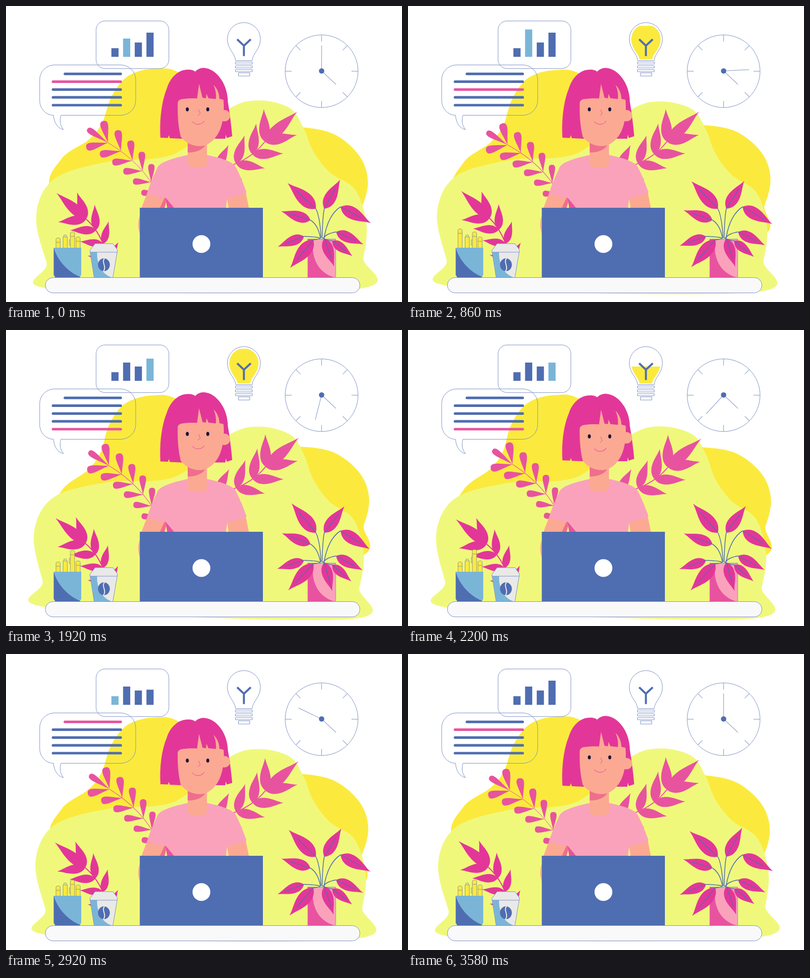
Write an HTML page with a canvas that moves like this. It is 800x600 px and loops after 3600 ms.

```html
<!DOCTYPE html>
<html lang="en">
<head>
<meta charset="utf-8">
<title>Working at the desk</title>
<style>
html, body { margin: 0; width: 100%; height: 100%; overflow: hidden; background: #fff; }
canvas { display: block; width: 800px; height: 600px; }
</style>
</head>
<body>
<canvas id="stage" width="800" height="600"></canvas>
<script>
const g = document.getElementById('stage').getContext('2d');
const LOOP = 3600, ACTION = 3560;
const HAIR = '#e23798', PINK = '#e8539f', ROSE = '#faa2bb', SKIN = '#fca993', SHADE = '#ee6f8b';
const BLUE = '#4f6db1', SKY = '#7ab5d8', YELLOW = '#fbea3d', LIME = '#f0f87c', LINE = '#8093c8';

const soft = p => (1 - Math.cos(Math.PI * p)) / 2;
const clamp = p => Math.min(1, Math.max(0, p));
const mix = (a, b, p) => a + (b - a) * p;
const ramp = (u, a, b) => clamp((u - a) / (b - a));
// eases 0 to 1 over a..b, then back to 0 over c..d
const swell = (u, a, b, c, d) => soft(ramp(u, a, b)) - soft(ramp(u, c, d));

function fill(d, color) {
  g.fillStyle = color;
  g.fill(new Path2D(d));
}
function line(d, color = LINE, width = 1) {
  g.strokeStyle = color;
  g.lineWidth = width;
  g.stroke(new Path2D(d));
}
function rect(x, y, w, h, color) {
  g.fillStyle = color;
  g.fillRect(x, y, w, h);
}
function oval(x, y, rx, ry, color) {
  g.fillStyle = color;
  g.beginPath();
  g.ellipse(x, y, rx, ry, 0, 0, 7);
  g.fill();
}
function box(x, y, w, h, r, color = 'transparent') {
  g.beginPath();
  g.roundRect(x, y, w, h, r);
  g.fillStyle = color;
  g.fill();
  g.strokeStyle = LINE;
  g.lineWidth = 1;
  g.stroke();
}
function within(change, draw) {
  g.save();
  change();
  draw();
  g.restore();
}
function spin(x, y, deg, draw) {
  within(() => {
    g.translate(x, y);
    g.rotate(deg * Math.PI / 180);
    g.translate(-x, -y);
  }, draw);
}

// smooth closed curve through a few points
function blob(points, color) {
  const n = points.length, at = i => points[(i + n) % n];
  let d = `M${at(0)}`;
  for (let i = 0; i < n; i++) {
    const [a, b, c, e] = [at(i - 1), at(i), at(i + 1), at(i + 2)];
    d += `C${b.map((v, k) => v + (c[k] - a[k]) / 6)} ${c.map((v, k) => v - (e[k] - b[k]) / 6)} ${c}`;
  }
  fill(d, color);
}
const HILL_BACK = [[92, 375], [112, 310], [167, 271], [194, 237], [214, 182], [248, 141], [303, 127],
  [360, 141], [480, 237], [545, 249], [600, 246], [665, 261], [714, 304], [731, 355], [718, 410],
  [680, 480], [200, 480]];
const HILL_FRONT = [[105, 575], [82, 520], [61, 425], [97, 351], [205, 316], [310, 308], [365, 285],
  [450, 209], [510, 191.5], [572, 206], [600, 245], [621, 295], [655, 338], [705, 372], [728, 440],
  [722, 510], [700, 575]];

// leaf of a given length, pointed or round at its end
function leaf(x, y, deg, L, color, round, w = L * (round ? .36 : .32)) {
  const half = s => round
    ? [`${L * .5} ${s * w * .25} ${L} ${s * w * .95} ${L} 0`, `${L} ${s * w * .95} ${L * .5} ${s * w * .25} 0 0`]
    : [`${L * .12} ${s * w * .45} ${L * .26} ${s * w * .54} ${L * .43} ${s * w * .5}C${L * .66} ${s * w * .42} ${L * .8} ${s * w * .13} ${L} 0`,
       `${L * .8} ${s * w * .13} ${L * .66} ${s * w * .42} ${L * .43} ${s * w * .5}C${L * .26} ${s * w * .54} ${L * .12} ${s * w * .45} 0 0`];
  within(() => {
    g.translate(x, y);
    g.rotate(deg * Math.PI / 180);
  }, () => fill(`M0 0C${half(-1)[0]}C${half(1)[1]}Z`, color));
}

// pairs of leaves along a curved stem, from its end down to its root
function twig({ root, bend, end, pairs, size, up, down, tip, color, round }) {
  line(`M${root}Q${bend} ${end}`, color, round ? 1 : 2);
  leaf(...end, tip[0], tip[1], color, round, tip[1] * .26);
  for (let i = 0; i < pairs; i++) {
    const p = i / (pairs - 1);
    const [x, y] = end.map((v, k) => mix(mix(v, bend[k], p), mix(bend[k], root[k], p), p));
    leaf(x, y, mix(...up, p), mix(...size, p), color, round);
    leaf(x, y, mix(...down, p), mix(...size, p), color, round);
  }
}
const LEFT_TWIG = { root: [308, 382], bend: [275, 318], end: [206, 277], pairs: 6, size: [45, 35],
  up: [-102, -86], down: [167, 187], tip: [214, 50], color: PINK, round: true };
const RIGHT_TWIG = { root: [425, 332], bend: [490, 318], end: [523, 275], pairs: 4, size: [66, 56],
  up: [-92, -64], down: [-12, 20], tip: [-43, 89], color: PINK };
const DARK_TWIG = { root: [206, 515], bend: [195, 462], end: [162, 432], pairs: 4, size: [57, 42],
  up: [-109, -60], down: [174, 192], tip: [221.5, 80], color: HAIR };

function bubbles(u) {
  box(182, 30.3, 147, 96.5, 18);
  line('M98 119.5H232A30 30 0 0 1 262 149.5V191.5A30 30 0 0 1 232 221.5H111C108 232 109 242 116 250.5' +
    'C104 248 97 236 96 221.5A28 30 0 0 1 68 191.5V149.5A30 30 0 0 1 98 119.5Z');

  const grow = clamp(1 - Math.abs(u - 900) / 900), shrink = clamp(1 - Math.abs(u - 2700) / 900);
  const heights = [17.5, 37 + 19 * grow, 29, 49 - 25.5 * shrink];
  const lit = u < LOOP ? (Math.floor(u / 900) + 1) % 4 : -1;
  heights.forEach((h, i) => rect(212.9 + i * 23.6, 103 - h, 14.5, h, i === lit ? SKY : BLUE));

  const hot = (Math.min(5, Math.floor(u / 600)) + 1) % 5;
  g.lineCap = 'round';
  for (let i = 0; i < 5; i++) {
    line(`M${i ? 95 : 119} ${137.6 + i * 15.85}H231.7`, i === hot ? PINK : BLUE, 5.2);
  }
  g.lineCap = 'butt';
}

function bulb(u) {
  const level = 110 - 72 * (ramp(u, 0, 900) - ramp(u, 2000, 2450));
  within(() => {
    g.beginPath();
    g.rect(440, level, 80, 112 - level);
    g.clip();
  }, () => fill('M467.5 108C467 97 451 87 451 67A29.6 29.6 0 0 1 510.2 67C510.2 87 494 97 493.5 108Z', YELLOW));
  line('M463.8 110.5C463 96 447.3 88 447.2 67A33.4 33.4 0 0 1 514 67C513.9 88 498 96 497.5 110.5Z');
  for (let y = 113.5; y < 130; y += 7.7) line(`M463.5 ${y}h34v4.2h-34z`);
  line('M469.5 135.5h23v6.4h-23z');
  line('M467 67.5L480.6 80.5L494.5 67.5M480.6 79V101.5', BLUE, 4);
}

function clock(u) {
  const x = 637.6, y = 131.6;
  g.beginPath();
  g.arc(x, 132.2, 73.6, 0, 7);
  g.strokeStyle = LINE;
  g.lineWidth = 1;
  g.stroke();
  for (let i = 0; i < 8; i++) spin(x, 132.2, i * 45, () => line(`M${x} 58.8v13`));
  line(`M${x} ${y}L666.5 159`, BLUE);
  spin(x, y, u / 10, () => line(`M${x} ${y}V80`));
  oval(x, y, 5.4, 5.4, BLUE);
}

function girl(nod) {
  within(() => {
    g.translate(0, 207);
    g.scale(1, 1 - .049 * nod);
    g.translate(0, -207);
  }, () => fill('M312 267C310 231 314 194 325 167C332 144 349 128 369 129C375 129 380 131 382 133' +
    'C388 127 394 125.5 400 125.5C427 127 448 162 448 193C452 216 455 241 457 264L446 267.5' +
    'L444 261L443 269H354L331 268L329 262L327 267.5Z', HAIR));

  // arms and shirt
  fill('M286 377L323 386L311 411H273Z', SKIN);
  fill('M270.5 425C266 435 266 450 270.5 462Z', SKIN);
  fill('M321 387L325 392L320 411H310Z', SHADE);
  fill('M446 386L484 376L491 411H450Z', SKIN);
  fill('M305 330C307 320 325 311 367 302H406C440 309 459 317 464 326C472 341 480 361 486 378' +
    'C474 384 460 387 447 389L444 411H326L322 389C308 388 297 384 285 380C290 362 298 345 305 330Z', ROSE);
  fill('M322 388L341 411H326Z', PINK);

  // neck
  fill('M367 272H406V316Q406 328 393 328H380Q367 328 367 316Z', SKIN);
  fill('M367 276L404 280C398 292 382 297.5 367 297Z', SHADE);

  // face
  oval(441, 222.3 - 4 * nod, 12, 11.5, SKIN);
  fill('M350 155H430C438 170 440 190 440 205C440 225 437 240 431 254C422 272 408 284 392 284' +
    'C376 284 362 277 353 265C348 245 346 220 347 195Z', SKIN);

  within(() => g.translate(0, 4 * nod), () => {
    fill('M346 198C347 193 350 190 354 189C365 187 376 187 386 187.5L390 158L397 186L404 187L405 178' +
      'L409 187L424 188.5C425 178 423 168 419 160C427 167 431 178 431 188L439 190L448 193' +
      'C447 165 435 143 420 136H362C342 150 335 180 337 198Z', HAIR);
  });
  within(() => g.translate(0, 6.5 * nod), () => {
    oval(366.3, 209.5, 3, 4.1, '#15123a');
    oval(407.6, 209.5, 3, 4.1, '#15123a');
    line('M389 210L392.5 218L387.5 222', PINK);
    line('M376.5 234C382 242 395 242 400.5 233', PINK, 1.1);
  });
}

function pen(x, y) {
  const d = `M${x} 495V${y + 3}Q${x} ${y} ${x + 4.3} ${y}T${x + 8.6} ${y + 3}V495`;
  fill(d, YELLOW);
  line(`${d}M${x} ${y + 9}h8.6`, '#8a8f86', .9);
}

function cups(u) {
  const third = 458 - 13 * swell(u, 900, 2250, 2250, 2900);
  pen(101, 470 - 22 * swell(u, 0, 1200, 1200, 1800));
  rect(115.3, 468, 8.7, 27, YELLOW);
  line('M115.3 495V468H124V495M117 468V464.3H122V468', '#8a8f86', .9);
  pen(130, third);
  line(`M130 ${third + 16}h-2v11h2`);
  pen(141.3, 468);

  fill('M96.5 490H152V545L149 550H99.5L96.5 545Z', SKY);
  fill('M96.5 490C103 514 124 539 150 549L149 550H99.5L96.5 545Z', BLUE);

  fill('M170 498H224.6L216 550H178Z', '#e9e9e8');
  fill('M170 498H184C183 522 193 543 213 550H178Z', SKY);
  line('M170 499L178 550M224.6 499L216 550');
  oval(197.8, 524.6, 12, 13, BLUE);
  line('M199 511.5C192 520 204 527 197 538', '#e9e9e8', 2);
  const lid = 'M180 481.7H216L225 494V499H169.7V495Z';
  fill(lid, '#e9e9e8');
  line(lid);
}

// leaf base and tip
const POT_LEAVES = [
  [626, 411, 569, 359], [643, 411, 675, 352], [676, 407, 737, 440],
  [615, 434, 556, 416], [602, 467, 549, 488], [621, 474, 574, 531],
  [667, 458, 722, 483], [659, 476, 700, 507], [643, 471, 663, 528]];

function potPlant(breath) {
  fill('M609.5 472.5H666V550H609.5Z', ROSE);
  fill('M609.5 472.5H621C615 508 630 541 663 550H609.5Z', PINK);
  line('M609.5 476V472.5H666V550');

  for (const [x, y, tx, ty] of POT_LEAVES) {
    const L = Math.hypot(tx - x, ty - y), turn = Math.atan2(ty - y, tx - x) * 180 / Math.PI;
    const rootX = mix(638, x, .12), lift = Math.max(0, 416 - ty);
    line(`M${rootX} 470Q${mix(rootX, x, .25)} ${mix(470, y, .75)} ${x} ${y}`, BLUE, 1.5);
    spin(x, y, (4 + lift * .075) * breath, () => {
      leaf(x, y, turn, L, HAIR, false, L * .35);
      line(`M${x} ${y}L${mix(x, tx, .7)} ${mix(y, ty, .7)}`, BLUE, 1.3);
    });
  }
}

function draw(t) {
  const u = Math.min(LOOP, t * LOOP / ACTION);
  const breath = soft(u / 1800);
  const sway = swell(u, 0, 1200, 1200, 2400) - swell(u, 1200, 2400, 2400, 3600);
  const droop = swell(u, 1200, 2400, 2400, 3600);
  const nod = swell(u, 1800, 2300, 3000, 3540);

  rect(0, 0, 800, 600, '#fff');
  spin(415, 300, -2.9 * breath, () => blob(HILL_BACK, YELLOW));
  spin(395, 300, 2.2 * breath, () => blob(HILL_FRONT, LIME));

  spin(330, 410, -2.5 * sway, () => twig(LEFT_TWIG));
  spin(440, 325, 2.4 * droop, () => twig(RIGHT_TWIG));
  spin(205, 500, 2.9 * sway, () => twig(DARK_TWIG));

  bubbles(u);
  bulb(u);
  clock(u);
  girl(nod);

  rect(270.3, 409, 248.7, 141.5, BLUE);
  oval(394.8, 482.5, 18, 18, '#fff');

  cups(u);
  potPlant(breath);
  box(79.5, 550.5, 635.5, 31, 15.5, '#f9f9fa');
}

const start = performance.now();
function tick(now) {
  draw(Math.max(0, now - start) % LOOP);
  requestAnimationFrame(tick);
}
draw(0);
requestAnimationFrame(tick);
</script>
</body>
</html>
```
